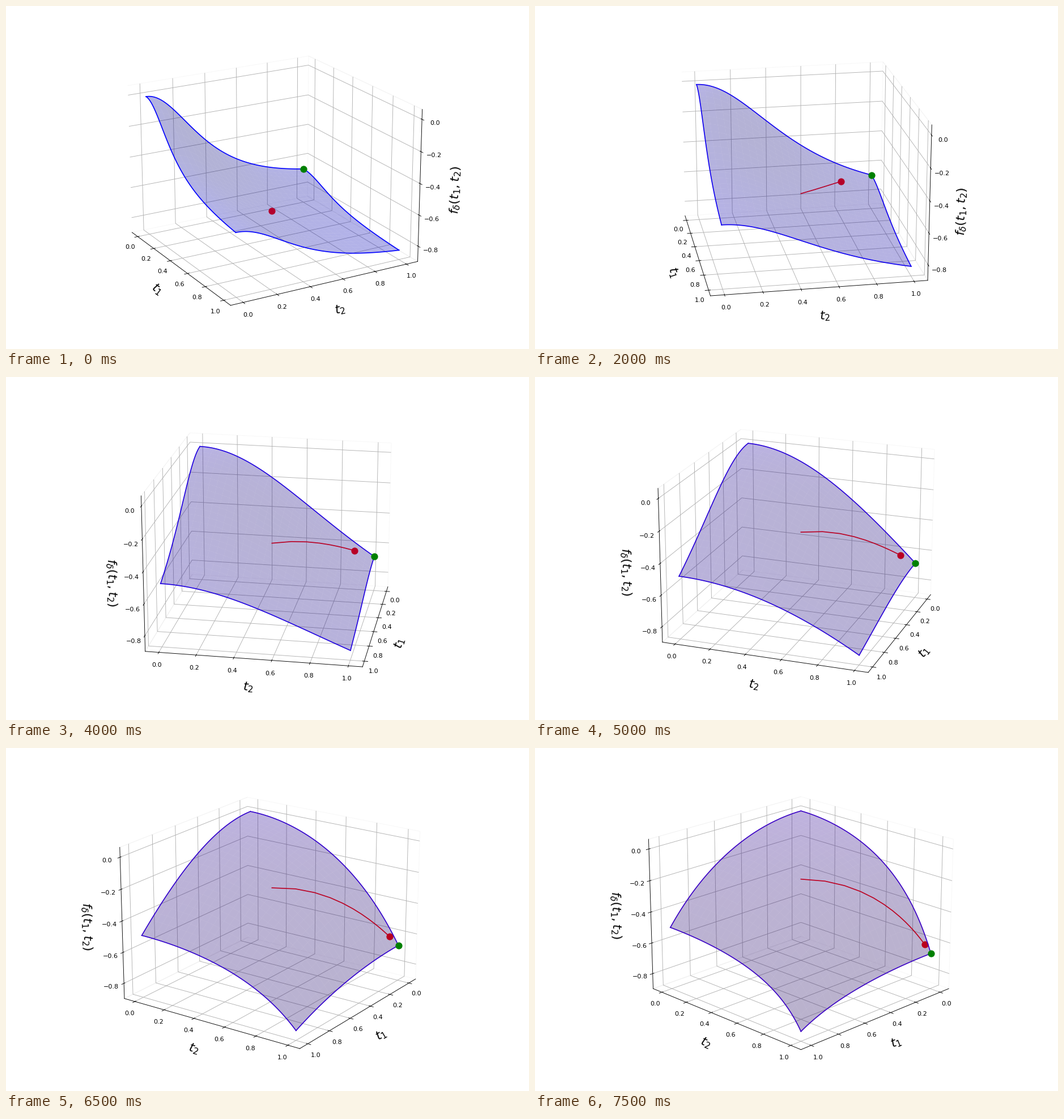
Recreate the animation shown at these times as a matplotlib script. Size 923 by 606 pixels, loop 8 s.

```python
import numpy as np
import matplotlib.pyplot as plt
from matplotlib.animation import FuncAnimation

W, H, DPI = 923, 606, 80
FRAMES, STEP_MS = 16, 500
PAD = 12                          # margin above and below the axes, px

C1, C2 = np.sqrt(0.499), np.sqrt(0.668)   # correlations with the response
RHO = 0.4025                              # correlation between predictors
RATIO = 1.48                              # variance ratio of the predictors
DELTA0, GROWTH = 0.0941, 0.1739
SHRINK = 0.818                            # step towards the vertex (0, 1)


def f(t1, t2, delta):
    """Relaxed best-subset objective."""
    a = t1**2 + delta * (1 - t1**2)
    d = t2**2 + RATIO * delta * (1 - t2**2)
    m = RHO * t1 * t2
    b1, b2 = C1 * t1, C2 * t2
    return -(d * b1**2 - 2 * m * b1 * b2 + a * b2**2) / (a * d - m**2)


def padded(lo, hi):
    p = (hi - lo) * 7 / 96
    return lo - p, hi + p


fig = plt.figure(figsize=(W / DPI, H / DPI), dpi=DPI, facecolor="white")
ax = fig.add_axes([0, PAD / H, 1, 1 - 2 * PAD / H], projection="3d",
                  computed_zorder=False)
ax.patch.set_visible(False)
ax.set_xlim(*padded(0, 1))
ax.set_ylim(*padded(0, 1))
ax.set_zlim(*padded(f(1.0, 1.0, 1.0), 0))
ax.set_autoscale_on(False)
for axis in (ax.xaxis, ax.yaxis, ax.zaxis):
    axis.pane.fill = False
ax.set_xlabel("$t_1$", fontsize=20, labelpad=11)
ax.set_ylabel("$t_2$", fontsize=20, labelpad=11)
ax.set_zlabel(r"$f_\delta(t_1, t_2)$", fontsize=20, labelpad=11)

grid = np.linspace(0, 1, 51)
T1, T2 = np.meshgrid(grid, grid)
s = np.linspace(0, 1, 120)
zero, one = np.zeros_like(s), np.ones_like(s)
EDGES = [(s, zero), (s, one), (zero, s), (one, s)]
drawn = []


def update(k):
    while drawn:
        drawn.pop().remove()
    delta = DELTA0 * np.exp(GROWTH * k)
    mix = k / 66
    color = (mix, 0, 1 - mix)
    ax.view_init(elev=20, azim=5 * k - 30)

    def curve(t1, t2, **style):
        drawn.extend(ax.plot(t1, t2, f(t1, t2, delta), **style))

    def dot(t1, t2, color, zorder):
        drawn.append(ax.scatter([t1], [t2], [f(t1, t2, delta)], s=100,
                                color=color, depthshade=False, zorder=zorder))

    t1 = 0.5 * SHRINK ** np.arange(k + 1)
    curve(t1, 1 - t1, color="red", lw=1.5, zorder=1)
    dot(t1[-1], 1 - t1[-1], "red", 1)
    drawn.append(ax.plot_surface(T1, T2, f(T1, T2, delta), color=color,
                                 alpha=0.3, rcount=50, ccount=50, linewidth=0,
                                 antialiased=True, zorder=2))
    for u, v in EDGES:
        curve(u, v, color=color, lw=1.5, zorder=3)
    dot(0.0, 1.0, "green", 4)
    return drawn


anim = FuncAnimation(fig, update, frames=FRAMES, interval=STEP_MS,
                     init_func=lambda: update(0), repeat=True,
                     repeat_delay=0, blit=False)
plt.show()
```
